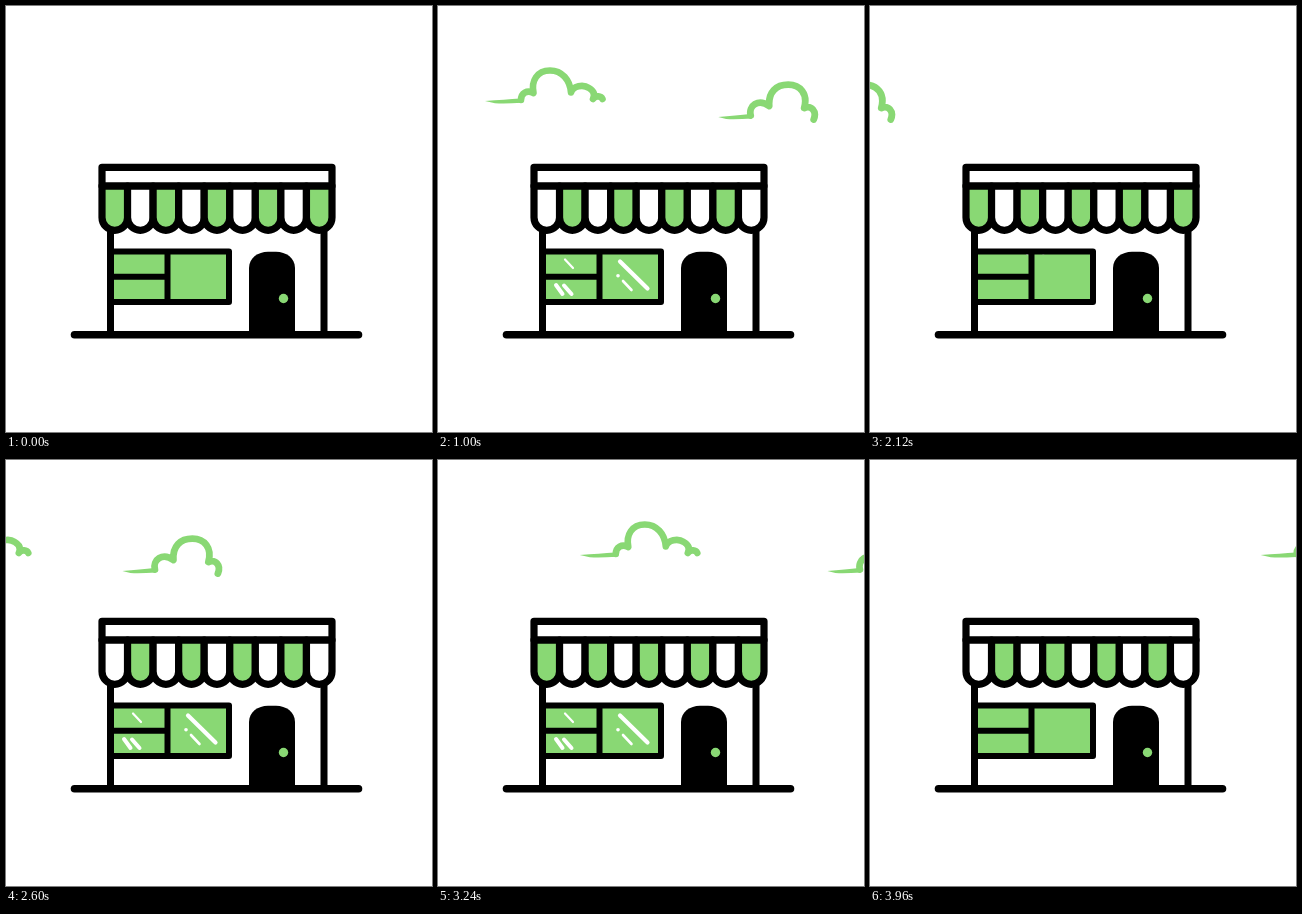
These frames come from a looping animation (426x426 px, 4000 ms). An HTML page:

```html
<!DOCTYPE html>
<html lang="en">
<head>
<meta charset="utf-8">
<title>Shop</title>
<style>
  html, body { margin: 0; width: 100%; height: 100%; overflow: hidden; background: #fff; }
  svg { display: block; width: 100vw; height: 100vh; }
  .line { fill: none; stroke-linecap: round; stroke-linejoin: round; }
</style>
</head>
<body>
<svg viewBox="0 0 426 426">
  <defs>
    <clipPath id="panes">
      <path d="M107 248H159V268H107Z M107 273H159V294H107Z M164 248H221V294H164Z"/>
    </clipPath>
  </defs>

  <g id="low" fill="#89d874">
    <path d="M0 111Q18 109.400 32 108L34 112.400Q18 113.600 8 113Z"/>
    <path class="line" stroke="#89d874" stroke-width="6.800"
      d="M32.500 109.500C30 100 40 92 51 100C50 86 58 78.700 70 78.700C82 78.700 90 88 86 102C93 99 99 105 95.500 113.500"/>
  </g>
  <g id="high" fill="#89d874">
    <path d="M0 95Q20 93.800 35 92.600L37 96.800Q20 97.800 10 97.200Z"/>
    <path class="line" stroke="#89d874" stroke-width="6.600"
      d="M36 94C36 87 42 83.500 48.500 87C46 75 52 64.500 65 64.500C77 64.500 85 74 86 86.500C88 80 98 78 104 82C109 85 110 89 108 93C111 89 116 90 117.500 93"/>
  </g>

  <path d="M104.500 245.500H223V296H104.500Z" fill="#89d874"/>
  <g clip-path="url(#panes)">
    <g id="glare" class="line" stroke="#fff">
      <path stroke-width="2.200" d="M127 253.500L135 262"/>
      <path stroke-width="4" d="M118 279L124.500 288M126 279.500L133.500 288"/>
      <path stroke-width="4.200" d="M182 255.500L209.500 282.500"/>
      <path stroke-width="3.600" d="M180 269.800h.01"/>
      <path stroke-width="2.600" d="M185 275L193.500 284"/>
    </g>
  </g>
  <g class="line" stroke="#000">
    <path stroke-width="6" d="M104.500 245.500H223V296H104.500M161.500 245.500V296M104.500 270.800H161.500"/>
    <path stroke-width="7" d="M104.500 225V328M318 225V328"/>
    <path stroke-width="7.600" d="M68.500 328.800H352.500"/>
  </g>

  <path d="M243 329V262C243 252 252 245.800 262 245.800H270C280 245.800 289 252 289 262V329Z"/>
  <circle cx="277.500" cy="292.500" r="4.700" fill="#89d874"/>

  <g id="awning" class="line" stroke="#000" stroke-width="7.200"></g>
  <path class="line" stroke="#000" stroke-width="7.200" d="M96 180V161.300H326V180Z"/>
</svg>
<script>
const $ = id => document.getElementById(id);
const NS = "http://www.w3.org/2000/svg";
const GREEN = "#89d874";
const CYCLE = 2000, STEP = 40, FPS = 30;

const stripes = Array.from({ length: 9 }, (_, i) => {
  const w = 230 / 9, x = 96 + i * w;
  const p = document.createElementNS(NS, "path");
  p.setAttribute("d", `M${x} 180V211.500a${w / 2} 12.800 0 0 0 ${w} 0V180Z`);
  return $("awning").appendChild(p);
});

const clamp = v => Math.min(1, Math.max(0, v));
const shift = (id, x, y = 0) => $(id).setAttribute("transform", `translate(${x} ${y})`);

function draw(ms) {
  // the scene runs at 30 ticks a second and is shown every 40 ms
  const shown = Math.floor((ms % CYCLE) / STEP) * STEP;
  const tick = Math.ceil(shown * FPS / 1000 - 0.001);

  shift("low", 280.2 + 13.65 * (tick - 30));
  shift("high", 47 + 11.85 * (tick - 30));

  const phase = Math.max(0, Math.ceil(tick / 15) - 1) % 2;
  stripes.forEach((s, i) => s.setAttribute("fill", i % 2 === phase ? GREEN : "#fff"));

  // reflections slide in, rest, then slide out along the diagonal
  const enter = clamp((tick - 3) / 13), leave = clamp((tick - 48) / 10);
  const d = -46 * (1 - enter) ** 3 + 46 * leave ** 2;
  shift("glare", d, d);
}

const start = performance.now();
function loop() {
  draw(performance.now() - start);
  requestAnimationFrame(loop);
}
draw(0);
requestAnimationFrame(loop);
</script>
</body>
</html>
```
